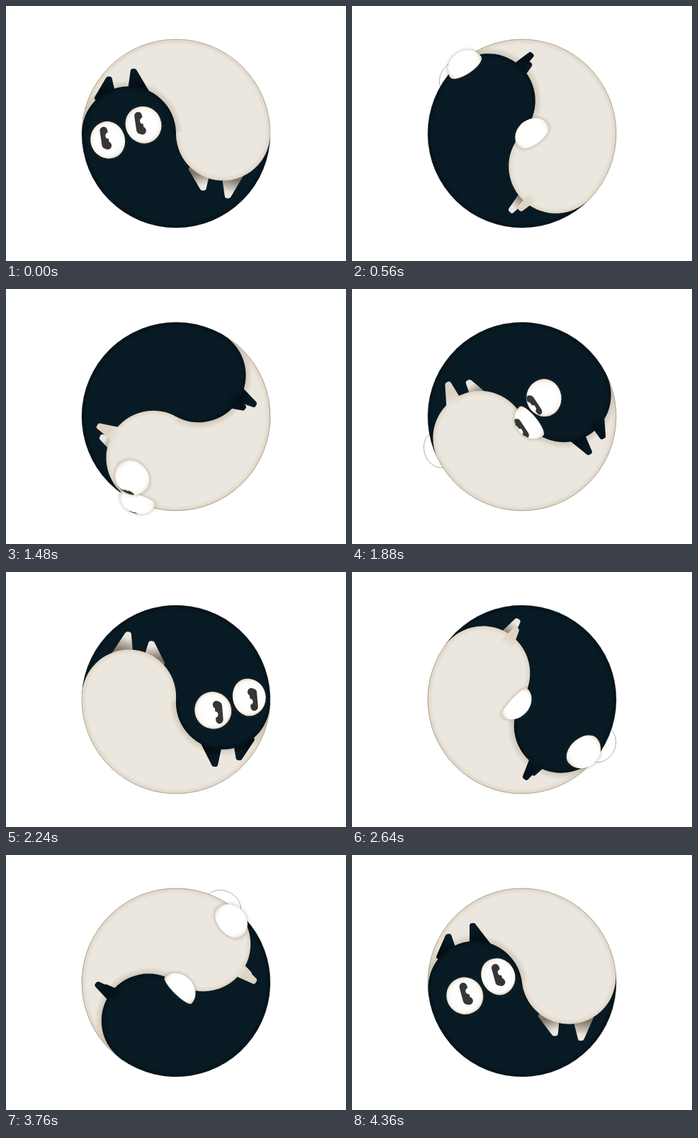
These frames come from a looping animation (480x360 px, 4400 ms). An HTML page with a canvas:

```html
<!DOCTYPE html>
<html lang="en">
<head>
<meta charset="utf-8">
<title>Rolling yin-yang cats</title>
<style>
html, body { margin: 0; width: 100%; height: 100%; overflow: hidden; background: #fff; }
canvas { display: block; }
</style>
</head>
<body>
<canvas id="stage" width="480" height="360"></canvas>
<script>
const ctx = document.getElementById('stage').getContext('2d');
const TAU = Math.PI * 2, { sin, cos, abs, hypot, atan2 } = Math;
const R = 133, HEAD = 66.5, EYE = 26.5, DOME = 22;
const STEP = 40, STEPS = 110, POSES = 106;
const HOLDS = [7, 29, 57, 85, 96];

const dark = { fill: '#081a24', rim: '#04121b', earBase: '#030c13' };
const light = { fill: '#ebe6de', rim: '#ddd4c3', earBase: '#81776a' };

// Longitudes are measured around each head's rolling axis.
const eyes = [{ lon: 0.5, y: -9 }, { lon: -0.34, y: 12 }];
const ears = [
  { lon: 1.8, tipR: 29, tipY: 77, baseR: 34, baseY: 50 },
  { lon: -1.3, tipR: 7, tipY: 88, baseR: 14, baseY: 58 }
];

function radial(r0, r1, from, to) {
  const g = ctx.createRadialGradient(0, 0, r0, 0, 0, r1);
  g.addColorStop(0, from);
  g.addColorStop(1, to);
  return g;
}

function sector(r, a0, a1, fill) {
  ctx.beginPath();
  ctx.arc(0, 0, r, a0, a1);
  ctx.fillStyle = fill;
  ctx.fill();
}

// Local x points away from the centre, local y along the travel.
function inHead(head, paint) {
  ctx.save();
  ctx.rotate(head.turn);
  ctx.translate(HEAD, 0);
  paint();
  ctx.restore();
}

function drawEar(ear, { spin, tone }, front) {
  const a = ear.lon + spin;
  const tip = ear.tipR * sin(a), base = ear.baseR * sin(a);
  const w = 4 + 8 * abs(cos(spin));
  const g = ctx.createLinearGradient(base, ear.baseY, tip, ear.tipY);
  g.addColorStop(front ? 0 : 0.2, front ? tone.fill : tone.earBase);
  g.addColorStop(front ? 0.5 : 0.85, front ? tone.rim : tone.fill);
  ctx.beginPath();
  ctx.moveTo(base - w, ear.baseY);
  ctx.lineTo(tip - 1, ear.tipY);
  ctx.lineTo(tip + 1, ear.tipY);
  ctx.lineTo(base + w, ear.baseY);
  ctx.closePath();
  ctx.lineJoin = 'round';
  ctx.lineWidth = 7;
  ctx.fillStyle = ctx.strokeStyle = g;
  ctx.fill();
  ctx.stroke();
}

function drawPupil(x, y, gaze) {
  const squash = cos(gaze);
  if (squash < 0.25) return;
  ctx.translate(x + 25 * sin(gaze), y + 2);
  ctx.scale(squash, 1);
  ctx.lineCap = ctx.lineJoin = 'round';
  ctx.strokeStyle = '#363634';
  ctx.lineWidth = 11;
  ctx.beginPath();
  ctx.moveTo(2, 11);
  ctx.lineTo(-1, -9);
  ctx.lineTo(-4, -10);
  ctx.stroke();
  ctx.beginPath();
  ctx.arc(-5, 4, 4.5, 0, TAU);
  ctx.fillStyle = '#fff';
  ctx.fill();
}

// A shallow dome on the head: foreshortened base plus its bulging side.
function drawEye(eye, spin, front) {
  const a = eye.lon + spin, x = 60 * sin(a), y = eye.y;
  const dir = atan2(y, x), tilt = hypot(x, y) / 61.5;
  const inner = EYE * Math.sqrt(Math.max(0, 1 - tilt * tilt));
  const outer = hypot(inner, DOME * tilt);
  const shift = (outer - inner) / 2;
  const mx = x + shift * cos(dir), my = y + shift * sin(dir);
  ctx.save();
  ctx.beginPath();
  ctx.ellipse(x, y, outer, EYE, dir, -Math.PI / 2, Math.PI / 2);
  ctx.ellipse(x, y, inner, EYE, dir, Math.PI / 2, Math.PI * 1.5);
  ctx.closePath();
  const g = ctx.createRadialGradient(mx, my, 17, mx, my, 28);
  g.addColorStop(0, '#fff');
  g.addColorStop(0.5, '#fbf9f5');
  g.addColorStop(1, '#d5cab6');
  ctx.fillStyle = front ? g : '#fff';
  if (front) {
    ctx.shadowColor = 'rgba(70,55,30,.4)';
    ctx.shadowBlur = 5;
  }
  ctx.fill();
  ctx.shadowColor = 'transparent';
  if (front) {
    ctx.clip();
    drawPupil(x, y, spin + 0.2);
  } else {
    ctx.lineWidth = 0.7;
    ctx.strokeStyle = 'rgba(50,45,38,.5)';
    ctx.stroke();
  }
  ctx.restore();
}

function drawEyes(head, front) {
  const depth = eye => cos(eye.lon + head.spin);
  inHead(head, () => eyes
    .filter(e => depth(e) > 0 === front)
    .sort((p, q) => depth(p) - depth(q))
    .forEach(e => drawEye(e, head.spin, front)));
}

function drawShade(head) {
  ctx.save();
  ctx.beginPath();
  ctx.arc(0, 0, R, 0, TAU);
  ctx.clip();
  inHead(head, () =>
    sector(76, 0, Math.PI, radial(HEAD, 76, 'rgba(140,120,85,.28)', 'rgba(140,120,85,0)')));
  ctx.restore();
}

// The trailing half of each head is already part of the body.
function drawHead(head) {
  const { spin, tone } = head;
  const earInFront = ear => cos(ear.lon + spin) > 0.6;
  inHead(head, () => {
    ears.filter(e => !earInFront(e)).forEach(e => drawEar(e, head, false));
    sector(HEAD, -0.04, Math.PI + 0.04, radial(HEAD - 7, HEAD, tone.fill, tone.rim));
    ears.filter(earInFront).forEach(e => drawEar(e, head, true));
  });
}

function drawBody(turn) {
  ctx.save();
  ctx.rotate(turn);
  sector(R, 0, TAU, radial(R - 7, R, light.fill, light.rim));
  ctx.lineWidth = 0.8;
  ctx.strokeStyle = 'rgba(90,75,50,.5)';
  ctx.stroke();
  sector(R, 0, Math.PI, radial(R - 7, R, dark.fill, dark.rim));
  ctx.restore();
}

function draw(ms) {
  const step = Math.floor(ms / STEP) % STEPS;
  const pose = step - HOLDS.filter(h => h <= step).length;
  const turn = pose / POSES * TAU, spin = turn * 2;
  const pale = { turn, spin: spin - Math.PI, tone: light };
  const black = { turn: turn + Math.PI, spin, tone: dark };
  ctx.setTransform(1, 0, 0, 1, 0, 0);
  ctx.fillStyle = '#fff';
  ctx.fillRect(0, 0, 480, 360);
  ctx.translate(240, 180);
  [pale, black].forEach(h => drawEyes(h, false));
  drawBody(turn);
  drawShade(black);
  [pale, black].forEach(drawHead);
  [pale, black].forEach(h => drawEyes(h, true));
}

const start = performance.now();
function tick() {
  draw(performance.now() - start);
  requestAnimationFrame(tick);
}
tick();
</script>
</body>
</html>
```
